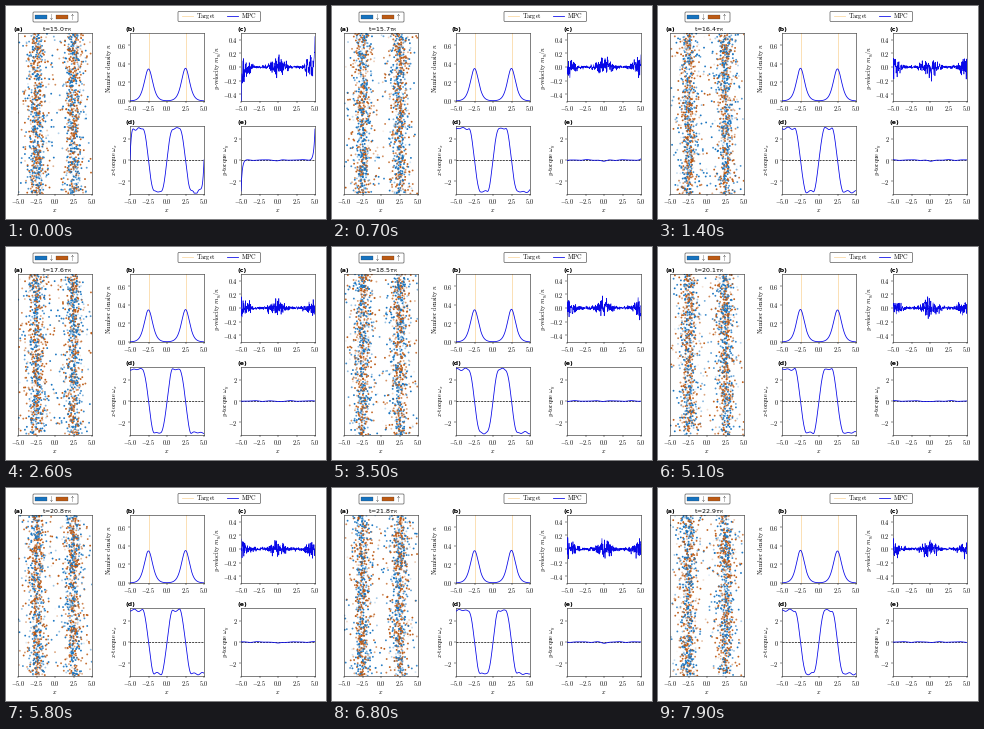
A matplotlib script for the animation above (8000 ms loop, 320 px wide and 213 px high).

```python
import matplotlib.pyplot as plt
import numpy as np
from matplotlib.animation import FuncAnimation
from matplotlib.patches import FancyBboxPatch, Rectangle

W, H, DPI = 320, 213, 64
PX = 72 / DPI  # one pixel in points
FRAMES, STEP_MS = 80, 100
FONT = 6.2 * PX
BLUE, BROWN, WHEAT, LINE = '#1673c0', '#bd5a14', '#fbd9a4', '#0808e8'
DOWN_RGB, UP_RGB = np.array([22, 115, 192]) / 255, np.array([189, 90, 20]) / 255

plt.rcParams.update({
    'mathtext.fontset': 'cm',
    'font.family': 'DejaVu Sans',
    'axes.linewidth': 0.55 * PX,
    'axes.edgecolor': '0.1',
})

fig = plt.figure(figsize=(W / DPI, H / DPI), dpi=DPI, facecolor='white')


def label(x, y, text, **kw):
    style = dict(ha='center', va='center', fontsize=FONT) | kw
    return fig.text(x / W, 1 - y / H, text, **style)


def panel(left, top, right, bottom, letter, ylim, yticks=(), fmt='{:.1f}'):
    ax = fig.add_axes([left / W, 1 - bottom / H, (right - left) / W, (bottom - top) / H])
    ax.set(xlim=(-5, 5), ylim=ylim)
    xticks = [-5, -2.5, 0, 2.5, 5]
    ax.set_xticks(xticks, [f'${v:.1f}$' for v in xticks])
    ax.set_yticks(yticks, ['$' + fmt.format(v) + '$' for v in yticks])
    ax.tick_params(length=1.7 * PX, width=0.45 * PX, pad=1.5 * PX, labelsize=FONT)
    label(left - 4, top - 2, letter, ha='left', va='baseline',
          fontsize=6.3 * PX, fontweight='bold')
    return ax


ax_a = panel(12, 27, 86, 188, '(a)', (0, 1))
ax_b = panel(124, 27, 198, 95, '(b)', (0, 0.735), (0, 0.2, 0.4, 0.6))
ax_c = panel(235, 27, 309, 95, '(c)', (-0.5, 0.5), (-0.4, -0.2, 0, 0.2, 0.4))
ax_d = panel(124, 120, 198, 188, '(d)', (-3.2, 3.2), (-2, 0, 2), '{:d}')
ax_e = panel(235, 120, 309, 188, '(e)', (-3.2, 3.2), (-2, 0, 2), '{:d}')

for cx in (49, 161, 272):
    label(cx, 204.2, '$x$')
label(103, 62, r'$\mathrm{Number\ density}\ n$', rotation=90)
label(212, 62, '$y\\mathrm{\u2010velocity}\\ m_y/n$', rotation=90)
label(109, 154, '$x\\mathrm{\u2010torque}\\ \\omega_x$', rotation=90)
label(220.5, 154, '$y\\mathrm{\u2010torque}\\ \\omega_y$', rotation=90)
title = label(50.5, 25.2, '', va='baseline', fontsize=6.3 * PX, math_fontfamily='dejavusans')

# Legends, laid out in pixels
key = fig.add_axes([0, 0, 1, 1], zorder=-1)
key.set(xlim=(0, W), ylim=(H, 0))
key.axis('off')


def frame_box(x0, y0, x1, y1):
    key.add_patch(FancyBboxPatch((x0 + 1, y0 + 1), x1 - x0 - 2, y1 - y0 - 2,
                                 boxstyle='round,pad=1', fc='white', ec='0.25', lw=0.6 * PX))


frame_box(27, 6, 72, 16)
for x, color, arrow in ((29, BLUE, r'$\downarrow$'), (50, BROWN, r'$\uparrow$')):
    key.add_patch(Rectangle((x, 9), 12, 4, fc=color, ec='0.2', lw=0.25 * PX))
    label(x + 16.5, 11, arrow)
frame_box(172, 5.5, 254.5, 15.5)
for x, color, name, tx in ((176, WHEAT, 'Target', 190.5), (220.5, LINE, 'MPC', 235)):
    key.plot([x, x + 11], [10, 10], color=color, lw=0.8 * PX)
    label(tx, 12.3, rf'$\mathrm{{{name}}}$', ha='left', va='baseline')

# Curves
xs = np.linspace(-5, 5, 361)
for x in (-2.5, 2.5):
    ax_b.axvline(x, color=WHEAT, lw=0.8 * PX)
for ax in (ax_d, ax_e):
    ax.axhline(0, color='black', lw=0.7 * PX, dashes=(3, 1.4))
line_b, line_c, line_d, line_e = (
    ax.plot(xs, 0 * xs, color=LINE, lw=width * PX, zorder=3)[0]
    for ax, width in ((ax_b, 0.8), (ax_c, 0.6), (ax_d, 0.8), (ax_e, 0.8)))


def ramp(d, half_width=0.8):
    return np.sin(np.pi / 2 * np.clip(d / half_width, -1, 1))


density = 0.35 * (np.cosh((xs + 2.5) / 0.74) ** -2 + np.cosh((xs - 2.5) / 0.74) ** -2)
square = -ramp(xs + 2.5) * ramp(xs) * ramp(xs - 2.5)
left_edge, right_edge = np.exp(-(xs + 5) / 0.16), np.exp((xs - 5) / 0.16)

# Particles swing about the two bands and drift along them
N = 1500
rng = np.random.default_rng(11)
center = np.where(np.arange(N) % 2, 2.5, -2.5)
amp = rng.normal(size=(4, N)) / 2
amp2 = rng.normal(size=(4, N)) / 2
rate = rng.uniform(0.2, 2.2, (4, N))
y0, drift = rng.random(N), rng.normal(0, 0.05, N)
spin0, spin_rate = rng.uniform(0, 2 * np.pi, N), rng.normal(0, 1.2, N)
dots = ax_a.scatter(center, y0, s=(1.85 * PX) ** 2, linewidths=0)


def particles(t):
    u = (amp * np.cos(rate * t) + amp2 * np.sin(rate * t)).sum(axis=0)
    x = center + 0.57 * u * (1 + 0.14 * u ** 2)
    x = (x + 5) % 10 - 5
    y = (y0 + drift * t + 0.012 * np.sin(rate[0] * t + spin0)) % 1
    spin = np.cos(spin0 + spin_rate * t)
    rgb = np.where(spin[:, None] > 0, UP_RGB, DOWN_RGB)
    return np.column_stack([x, y]), np.column_stack([rgb, np.abs(spin) ** 0.6])


def update(k):
    t = 0.1 * k
    kick = np.exp(-k / 2)  # edge disturbance at the start
    noise = np.random.default_rng([5, k])
    title.set_text(rf't={15 + t:.1f}$\tau_R$')

    offsets, colors = particles(t)
    dots.set_offsets(offsets)
    dots.set_facecolors(colors)

    line_b.set_ydata(density * (1 + 0.012 * np.sin(3 * xs + 2 * t)))

    sigma = 0.0062 / np.sqrt(density + 0.005)
    sigma *= 1 + 0.7 * kick * (np.abs(xs) > 3.6)
    line_c.set_ydata(noise.normal(size=xs.size) * sigma
                     + kick * (0.38 * right_edge - 0.48 * left_edge))

    ripple = 0.07 * np.sin(6.2 * xs + 1.7 * t) + 0.05 * np.sin(4 * xs - 1.1 * t + 1)
    ripple *= 1 + 2 * kick * (np.abs(xs) > 3.6)
    edge = 1 - kick * (left_edge + right_edge)
    line_d.set_ydata(np.clip((2.98 * square + ripple * np.abs(square)) * edge, -3.12, 3.12))

    bump = -0.07 * (1 + np.sin(1.3 * t)) * np.exp(-(xs / 0.5) ** 2)
    wave = 0.025 * np.sin(2.5 * xs + 1.4 * t) + 0.015 * np.sin(4.1 * xs - 2 * t)
    line_e.set_ydata(wave + bump + kick * 2.9 * (right_edge - left_edge))
    return dots, title, line_b, line_c, line_d, line_e


anim = FuncAnimation(fig, update, frames=FRAMES, interval=STEP_MS, repeat=True, repeat_delay=0)
plt.show()
```
